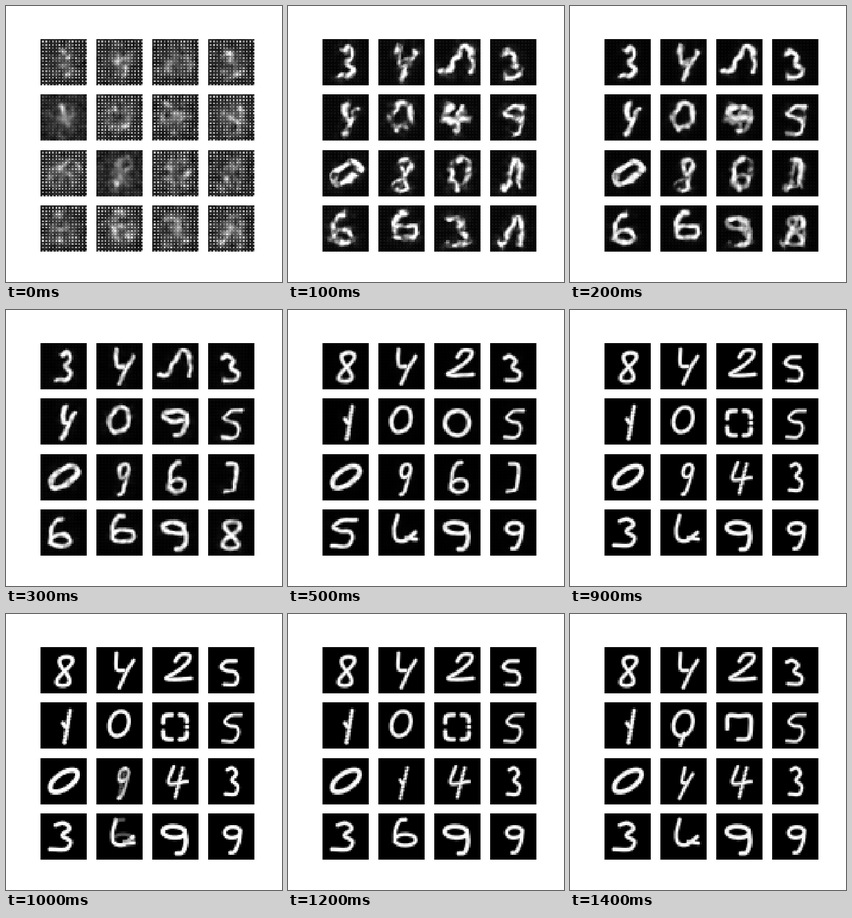
Recreate the animation shown at these times as a matplotlib script. Size 400 by 400 pixels, loop 1.5 s.

```python
import numpy as np
import matplotlib.pyplot as plt
from matplotlib.animation import FuncAnimation

N = 28            # pixels per tile side
SPAN = 67         # units per tile side
STEPS = 15
KEYS = [1, 3, 5, 9, 12, 14]

axis = (np.arange(N) + 0.5) * SPAN / N
X, Y = np.meshgrid(axis, axis)
MIDDLE = np.exp(-((X - 33) ** 2 + (Y - 34) ** 2) / 420)
ODD = np.arange(N) % 2
LATTICE = np.outer(ODD, ODD)
ANGLE = np.linspace(0, 2 * np.pi, 60)


def path(*pts):
    """Smooth curve through a few points."""
    p = np.array(pts, float)
    p = np.vstack([2 * p[0] - p[1], p, 2 * p[-1] - p[-2]])
    t = np.linspace(0, 1, 12)[:, None]
    return np.vstack([
        b + 0.5 * t * (c - a + t * (2 * a - 5 * b + 4 * c - d + t * (3 * (b - c) + d - a)))
        for a, b, c, d in zip(p, p[1:], p[2:], p[3:])])


def ring(rx=1, ry=1, cy=0, power=1):
    """Ellipse, squarer as the power falls."""
    bend = lambda v: np.sign(v) * np.abs(v) ** power
    return np.column_stack([rx * bend(np.cos(ANGLE)), cy + ry * bend(np.sin(ANGLE))])


# Shapes in a box from -1 to 1, y down
nine = np.vstack([ring(0.95, 0.42, -0.55),
                  path((0.95, -0.7), (0.9, 0.2), (0.5, 0.9), (0, 1))])
GLYPHS = {
    "0": ring(),
    "o": ring(power=0.35),
    "q": np.vstack([ring(), path((0.3, 0.8), (0.1, 1.7))]),
    "1": np.vstack([path((0, -1), (0, 1)), path((-0.9, -0.2), (-0.1, 0.1))]),
    "2": path((-0.25, -0.5), (0.2, -1), (0.9, -0.95), (0.75, -0.4),
              (-0.1, 0.35), (-1, 0.9), (-0.1, 1), (1, 0.9)),
    "3": path((-0.6, -0.85), (0.1, -1), (0.7, -0.6), (0.1, -0.1),
              (0.9, 0.35), (0.5, 0.9), (-0.9, 0.9)),
    "4": np.vstack([path((-0.6, -1), (-1, 0.1), (1, 0)), path((0.4, -0.9), (-0.1, 1))]),
    "5": path((1, -0.95), (-0.2, -0.9), (-0.9, -0.45), (-0.3, -0.15),
              (0.6, -0.05), (0.9, 0.4), (0.4, 0.95), (-0.9, 0.95)),
    "6": -nine,
    "8": np.column_stack([0.95 * np.sin(2 * ANGLE), -np.cos(ANGLE)]),
    "9": nine,
    "A": path((-1.5, 0.9), (-0.9, 1), (-0.4, 0), (0.3, -1), (0.9, -0.6), (0.9, 1)),
    "b": np.vstack([path((-0.7, -1), (-1, 0.1), (-0.8, 0.8), (0, 0.9), (0.9, 0.3)),
                    path((0.1, 0.7), (1, 0.8))]),
    "j": path((-0.5, -1), (0.6, -0.9), (0.7, -0.1), (0.3, 0.8), (-0.9, 1)),
    "n": path((-1, 0.1), (-0.9, -0.9), (0, -0.9), (0.9, -0.9), (1, 0), (0.8, 0.9), (-0.1, 1)),
    "y": np.vstack([path((-0.9, -1), (-0.9, -0.1), (-0.1, 0)),
                    path((1, -0.6), (0.2, 0.1), (-0.6, 1))]),
}

# Shape at each key step, centre, half size, lean, half line width
TILES = [
    ("338888", 35, 35, 10, 21, 3, 2.9), ("yyyyyy", 41, 34, 13, 25, 0, 2.6),
    ("AA2222", 38, 29, 18, 18, 0, 2.8), ("333553", 31, 37, 12, 18, -3, 2.7),
    ("yy1111", 39, 35, 8, 23, 4, 3.0), ("00000q", 33, 31, 14, 18, 3, 2.8),
    ("490oon", 33, 36, 17, 18, 0, 3.1), ("955555", 34, 37, 12, 20, 2, 2.3),
    ("000000", 34, 33, 16, 16, 12, 3.5), ("89991y", 37, 36, 7, 22, 5, 2.4),
    ("066444", 37, 34, 13, 22, 2, 2.6), ("Ajj333", 34, 34, 10, 20, 0, 2.6),
    ("665333", 30, 34, 16, 20, 2, 2.9), ("66bb6b", 39, 28, 16, 19, 0, 2.8),
    ("399999", 33, 38, 17, 20, -3, 3.2), ("A89999", 34, 38, 12, 19, 2, 2.8),
]
DIM = {4, 9}      # tiles whose first lattice is faint


def cloud(rng, passes):
    """Smooth noise from 0 to 1."""
    n = rng.random((N, N))
    for _ in range(passes):
        for ax in (0, 1):
            n = (np.roll(n, 1, ax) + 2 * n + np.roll(n, -1, ax)) / 4
    return (n - n.min()) / (n.max() - n.min())


def distance(tile, key, step):
    """Distance of every pixel to the line, with a warp that settles over time."""
    names, cx, cy, rx, ry, lean, _ = TILES[tile]
    gx, gy = GLYPHS[names[key]].T
    rng = np.random.default_rng(tile)
    warp = 12 * np.exp(-step / 2.5)
    px = X + warp * (cloud(rng, 6) - 0.5)
    py = Y + warp * (cloud(rng, 6) - 0.5)
    return np.hypot(px[..., None] - (cx + rx * gx - lean * gy),
                    py[..., None] - (cy + ry * gy)).min(axis=2)


def first_tile(tile):
    rng = np.random.default_rng(tile + 50)
    glow = np.exp(-(distance(tile, 0, 1) / 6) ** 2) * cloud(rng, 3) ** 2
    haze = 0.04 + 0.16 * cloud(rng, 1) + 0.3 * MIDDLE * cloud(rng, 2)
    gain = 0.15 if tile in DIM else 0.55
    dots = gain * LATTICE * (1 - 0.65 * MIDDLE) * (0.6 + 0.6 * cloud(rng, 0))
    return np.clip(haze + dots + 0.7 * glow, 0, 1)


def key_tile(tile, key):
    step = KEYS[key]
    rng = np.random.default_rng(100 * step + tile)
    early = np.exp(-(step - 1) / 2)
    d = distance(tile, key, step)
    width = TILES[tile][-1] + 0.8 * early
    ink = np.clip((width - d) / (2.6 + 2.5 * early) + 0.5, 0, 1)
    patches = np.clip(2.6 * cloud(rng, 2) - 0.4, 0, 1.2)
    ink *= 1 - 0.9 * early * (1 - patches)
    ink *= 1 - 0.06 * cloud(rng, 1)
    ink += early * (0.25 * np.exp(-(d / 11) ** 2) * cloud(rng, 2) ** 2 + 0.02 + 0.05 * LATTICE)
    return np.clip(ink, 0, 1)


keyed = {s: [key_tile(i, k) for i in range(16)] for k, s in enumerate(KEYS)}
keyed[0] = [first_tile(i) for i in range(16)]


def tile_at(tile, step):
    if step in keyed:
        return keyed[step][tile]
    lo = max(k for k in KEYS if k < step)
    hi = min(k for k in KEYS if k > step)
    t = (step - lo) / (hi - lo)
    mix = (1 - t) * keyed[lo][tile] + t * keyed[hi][tile]
    return mix + 0.5 * mix * (1 - mix) * (2 * mix - 0.6)


fig, axes = plt.subplots(4, 4, figsize=(4, 4), dpi=100)
views = []
for i, ax in enumerate(axes.flat):
    ax.axis("off")
    views.append(ax.imshow(tile_at(i, 0), cmap="gray", vmin=0, vmax=1,
                           interpolation="nearest"))


def draw(step):
    for i, view in enumerate(views):
        view.set_data(tile_at(i, step))
    return views


anim = FuncAnimation(fig, draw, frames=STEPS, interval=100, repeat=True, repeat_delay=0)
plt.show()
```
